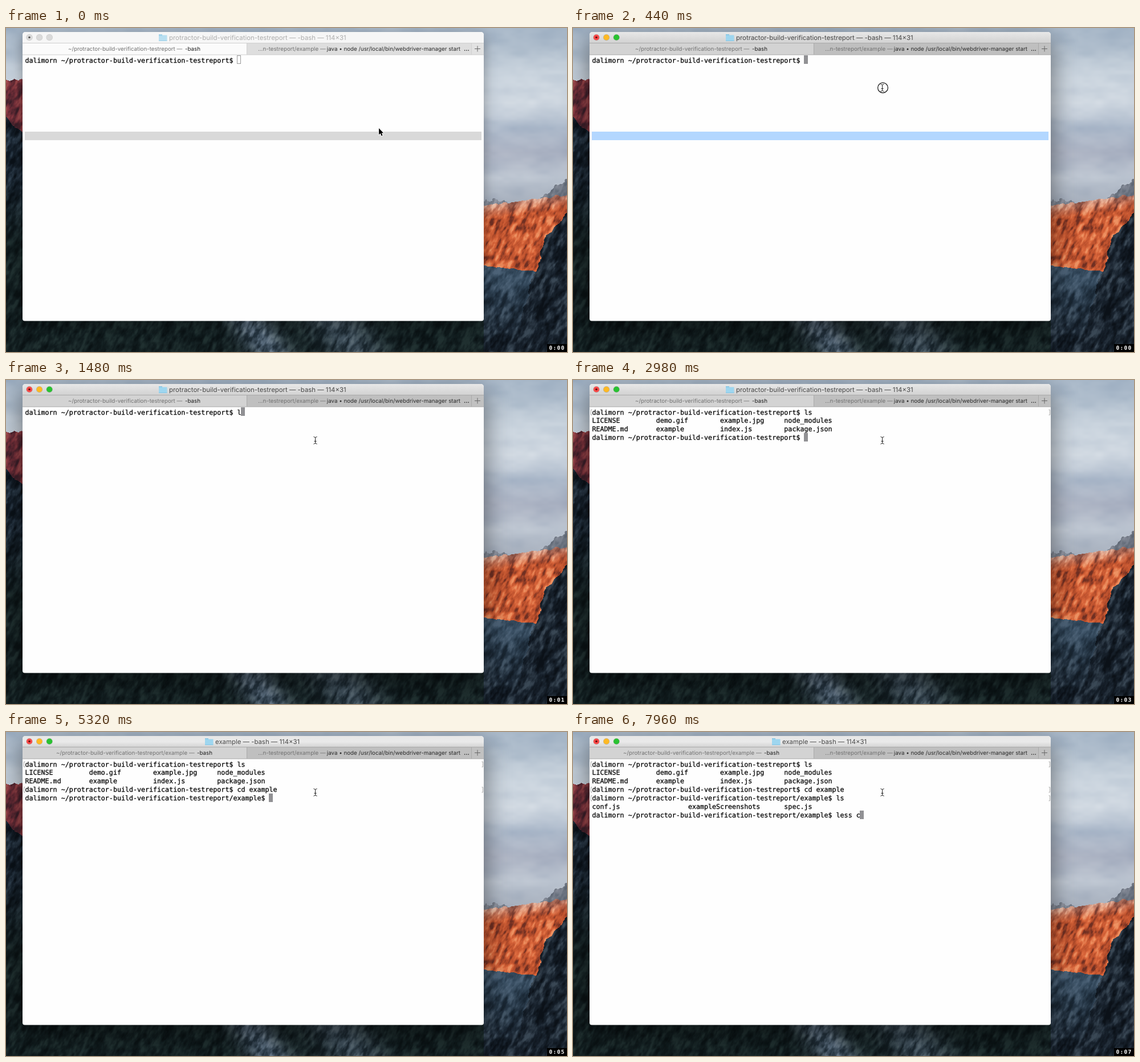
Recreate the animation shown at these times as an HTML page with a canvas. Size 984 by 569 pixels, loop 8000 ms.

```html
<!DOCTYPE html>
<html lang="en">
<head>
<meta charset="utf-8">
<title>Terminal session</title>
<style>
  html, body { margin: 0; width: 100%; height: 100%; overflow: hidden; background: #10181f; }
  canvas { display: block; }
</style>
</head>
<body>
<canvas id="stage" width="984" height="569"></canvas>
<script>
const W = 984, H = 569, LOOP = 8000;
const ctx = document.getElementById('stage').getContext('2d');
const MONO = '11.667px "DejaVu Sans Mono", monospace';
const CELL = 7.024, ROW = 14.88, LEFT = 33.5, TOP = 48.3;
const TITLE = '11.4px Inter, sans-serif';
const TAB = '9.75px Inter, sans-serif';
const WIN = { x: 29, y: 7, w: 809, h: 507.5, bar: 20 };
const RIGHT = WIN.x + WIN.w;

// ---- timing ----
const STEP = 150, MOVE = 140, CLICK = 440, RELEASE = 580;
const REPO = 'protractor-build-verification-testreport';
const EXAMPLE = REPO + '/example';
const prompt = dir => `dalimorn ~/${dir}$ `;

// A burst is a start time and its strokes, one per step.
const session = [
  { dir: REPO, bursts: [[1480, ...'ls']], enter: 1780, out: [
    'LICENSE         demo.gif        example.jpg     node_modules',
    'README.md       example         index.js        package.json'] },
  { dir: REPO, bursts: [[3730, ...'cd '], [4430, 'e'], [4730, 'xa', 'mp', 'le']], enter: 5320, out: [] },
  { dir: EXAMPLE, bursts: [[5470, ...'ls']], enter: 5760, out: [
    'conf.js                 exampleScreenshots      spec.js'] },
  { dir: EXAMPLE, bursts: [[6510, ...'le'], [6960, ...'ss '], [7960, 'c']], enter: Infinity, out: [] }
];
const ENTERED = session[1].enter;

function typedAt(t, bursts) {
  return bursts.map(([start, ...strokes]) =>
    strokes.filter((_, i) => t >= start + i * STEP).join('')).join('');
}
const secondsAt = t => Math.max(0, Math.floor((t - 880) / 1036) + 1);

// ---- helpers ----
const clamp = v => Math.min(1, Math.max(0, v));
const lerp = (a, b, u) => a + (b - a) * u;

function rect(color, x, y, w, h) {
  ctx.fillStyle = color;
  ctx.fillRect(x, y, w, h);
}
function line(color, width, ...points) {
  ctx.strokeStyle = color;
  ctx.lineWidth = width;
  ctx.beginPath();
  points.forEach(p => ctx.lineTo(...p));
  ctx.stroke();
}
function disc(color, x, y, r) {
  ctx.fillStyle = color;
  ctx.beginPath();
  ctx.arc(x, y, r, 0, 7);
  ctx.fill();
}
function shade(y0, y1, ...colors) {
  const fill = ctx.createLinearGradient(0, y0, 0, y1);
  colors.forEach((c, i) => fill.addColorStop(i / (colors.length - 1), c));
  return fill;
}
function label(str, x, y, font, color, align = 'left') {
  ctx.font = font;
  ctx.fillStyle = color;
  ctx.textAlign = align;
  ctx.fillText(str, x, y);
}

// ---- wallpaper ----
function hash(x, y) {
  const s = Math.sin(x * 127.1 + y * 311.7) * 43758.5453;
  return s - Math.floor(s);
}
function noise(x, y) {
  const ix = Math.floor(x), iy = Math.floor(y);
  const ease = v => v * v * (3 - 2 * v);
  const u = ease(x - ix), v = ease(y - iy);
  return lerp(lerp(hash(ix, iy), hash(ix + 1, iy), u),
    lerp(hash(ix, iy + 1), hash(ix + 1, iy + 1), u), v);
}
function fractal(x, y) {
  let sum = 0;
  for (let o = 1; o <= 4; o *= 2) sum += noise(x * o, y * o) / o;
  return sum / 1.75;
}
function ramp(...hexes) {
  const colors = hexes.map(h => [1, 3, 5].map(i => parseInt(h.slice(i, i + 2), 16)));
  return v => {
    const at = clamp(v) * (colors.length - 1), i = Math.min(Math.floor(at), colors.length - 2);
    return colors[i].map((c, k) => lerp(c, colors[i + 1][k], at - i));
  };
}
const blend = (a, b, u) => a.map((c, i) => lerp(c, b[i], clamp(u)));

const sky = ramp('#9caec1', '#adbccb', '#d3dce4', '#d9e0e7', '#a9b6c8', '#a2a8ba', '#b9c1cd', '#9da5b3');
const cloud = ramp('#8d9fb6', '#e6ebef');
const cliff = ramp('#6f2f22', '#b64d2b', '#d9653a', '#ee9262');
const snow = ramp('#8e5a4e', '#ecd6cc');
const ridge = ramp('#5d6673', '#9196a2');
const valley = ramp('#1f2f3e', '#33485b', '#4d6378');
const rock = ramp('#0b1118', '#18222d', '#3a4855');
const redRock = ramp('#3c1f29', '#77303a', '#a24b4d');
const slope = ramp('#0a1118', '#16212c', '#30404f');
const forest = ramp('#0a1214', '#121e20', '#203030');
const granite = ramp('#24333f', '#566879', '#8494a3');

function wallpaperColor(x, y) {
  const soft = fractal(x / 45, y / 22);
  const grit = clamp((fractal((x + y * 0.4) / 7, y / 13) - 0.5) * 1.8 + 0.5);
  const jag = (fractal(x / 9, y / 14) - 0.5) * 18;
  if (x > WIN.x + 12 && y > 500 && x < RIGHT) {
    const patch = (center, width) => Math.exp(-(((x - center - (y - 515) * 0.7) / width) ** 2));
    return blend(forest(grit), granite(grit - 0.05), patch(425, 36) + patch(575, 52) * 0.65);
  }
  if (x < RIGHT - 5 && y > 90 + jag) {
    if (y < 160 + x + jag) return redRock(grit);
    return blend(slope(grit), forest(grit), (y - 260) / 120);
  }
  const across = x - RIGHT;
  const rockEdge = 945 + (372 - y) * (y < 372 ? 0.75 : 0.3);
  if (y > 318 && x > rockEdge + jag * 0.6) return rock(grit);
  if (y > 417 + across * 0.11 + jag * 0.3) return blend(valley(grit), rock(grit), (y - 440) / 110);
  const cliffTop = 311 - across * 0.13 + jag * 0.5;
  if (y > cliffTop) return blend(cliff(grit), snow(grit), 0.75 - (y - cliffTop) / 32);
  if (y > 304 - Math.max(0, across - 85) * 0.6 + jag) return ridge(grit);
  return blend(sky(y / 305), cloud(soft), 0.3);
}
function paintWallpaper() {
  const canvas = document.createElement('canvas');
  canvas.width = W;
  canvas.height = H;
  const g = canvas.getContext('2d'), image = g.createImageData(W, H);
  for (let y = 0; y < H; y++) {
    for (let x = 0; x < W; x++) {
      const hidden = x > 40 && x < 830 && y > 15 && y < 505;
      if (!hidden) image.data.set([...wallpaperColor(x, y), 255], (y * W + x) * 4);
    }
  }
  g.putImageData(image, 0, 0);
  return canvas;
}
const wallpaper = paintWallpaper();

// ---- window ----
function drawFrame(active, inExample) {
  const { x, y, w, h, bar } = WIN, split = 422, plus = 817, tabs = y + bar;
  ctx.save();
  ctx.beginPath();
  ctx.roundRect(x, y, w, h, [5, 5, 4, 4]);
  ctx.save();
  ctx.shadowColor = active ? 'rgba(0,0,0,.5)' : 'rgba(0,0,0,.35)';
  ctx.shadowBlur = active ? 44 : 22;
  ctx.shadowOffsetY = active ? 15 : 7;
  ctx.fillStyle = '#fefefe';
  ctx.fill();
  ctx.restore();
  ctx.clip();

  const [top, middle, bottom] = !active ? ['#f6f6f6', '#f6f6f6', '#f6f6f6']
    : inExample ? ['#e6e6e6', '#eaeaea', '#d2d2d2'] : ['#e8e8e8', '#dcdcdc', '#d1d1d1'];
  rect(shade(y, tabs, top, middle, bottom), x, y, w, bar);
  rect(active ? '#d3d3d3' : '#fbfbfb', x, tabs, split - x, bar);
  rect(active ? '#bfbfbf' : '#dedede', split, tabs, plus - split, bar);
  rect(active ? '#c1c1c1' : '#e2e2e2', plus, tabs, RIGHT - plus, bar);
  const edge = active ? '#aaaaaa' : '#d0d0d0';
  for (const rowY of [tabs - 1, tabs + bar - 0.5]) rect(edge, x, rowY, w, 1);
  for (const colX of [split, plus - 1]) rect(edge, colX, tabs, 1, bar);
  line('#666', 1, [plus + 5, 36.5], [plus + 15, 36.5]);
  line('#666', 1, [plus + 10, 31.5], [plus + 10, 41.5]);
  ctx.restore();
}
function drawButtons(active) {
  ['#fb4948', '#fdb924', '#29c231'].forEach((color, i) => {
    const x = 41 + i * 17.6;
    disc(active ? 'rgba(0,0,0,.18)' : '#cbcbcb', x, 16.5, 5.7);
    disc(active ? color : '#dadada', x, 16.5, 5.1);
  });
  disc(active ? '#6b0d0b' : '#555', 41, 16.5, 1.8);
}
function drawLabels(active, inExample) {
  const iconX = inExample ? 349 : 268, baseline = 40.4;
  ctx.globalAlpha = active ? 1 : 0.7;
  rect('#86c5e4', iconX, 11, 6, 3);
  rect('#9ed6ef', iconX, 12.5, 14.5, 10);
  rect('#86c5e4', iconX, 22, 14.5, 1);
  ctx.globalAlpha = 1;

  const name = inExample ? 'example' : REPO;
  label(`${name} — -bash — 114×31`, iconX + 18, 20.7, TITLE, active ? '#474747' : '#adadad');
  label(`~/${inExample ? EXAMPLE : REPO} —`, inExample ? 88 : 109, baseline, TAB, '#707070');
  label('-bash', inExample ? 362 : 341, baseline, TAB, '#1c1c1c', 'right');
  label('...n-testreport/example —', 442, baseline, TAB, '#707070');
  label('java • node /usr/local/bin/webdriver-manager start', 797, baseline, TAB, '#292929', 'right');
  label('...', 803, baseline, 'bold ' + TAB, '#222');
}

// ---- terminal contents ----
function screenRows(t) {
  const rows = [];
  for (const { dir, bursts, enter, out } of session) {
    const done = t >= enter;
    rows.push({ text: prompt(dir) + typedAt(t, bursts), marked: done });
    if (!done) break;
    out.forEach(text => rows.push({ text }));
  }
  return rows;
}
function drawBracket(x, y, side) {
  line('#a6a6a6', 1, [x + 2 * side, y + 4], [x, y + 4], [x, y + 13], [x + 2 * side, y + 13]);
}
function drawRows(rows, active) {
  rows.forEach(({ text, marked }, i) => {
    const y = TOP + i * ROW;
    label(text, LEFT, y + 12.3, MONO, '#000');
    line('#000', 0.25);
    ctx.strokeText(text, LEFT, y + 12.3);
    if (!marked) return;
    drawBracket(WIN.x + 2.5, y, 1);
    drawBracket(RIGHT - 1.5, y, -1);
  });
  const last = rows.length - 1;
  const x = Math.floor(LEFT + rows[last].text.length * CELL - 0.3);
  const y = Math.round(TOP + last * ROW);
  if (active) return rect('#919194', x, y, 7, 15);
  ctx.strokeStyle = '#9a9a9a';
  ctx.lineWidth = 1;
  ctx.strokeRect(x + 0.5, y + 0.5, 6, 14);
}

// ---- pointer and timer ----
function drawArrow(x, y) {
  ctx.save();
  ctx.translate(x, y);
  ctx.lineJoin = 'round';
  ctx.beginPath();
  [[0, 0], [0, 11.5], [2.7, 9], [4.6, 13.4], [6.5, 12.6], [4.7, 8.4], [8.2, 8.4]]
    .forEach(p => ctx.lineTo(...p));
  ctx.closePath();
  ctx.strokeStyle = '#fff';
  ctx.lineWidth = 2;
  ctx.stroke();
  ctx.fillStyle = '#000';
  ctx.fill();
  ctx.restore();
}
function drawBeam(x, y) {
  line('#222', 1, [x, y - 5], [x, y + 5]);
  line('#222', 1, [x - 2, y + 1.5], [x + 2, y + 1.5]);
  for (const s of [-1, 1]) line('#222', 1, [x - 3, y + 6.5 * s], [x, y + 5 * s], [x + 3, y + 6.5 * s]);
}
function drawPointer(t) {
  if (t < CLICK) {
    const u = Math.max(0, Math.floor((t - MOVE) / STEP) + 1) / 2;
    return drawArrow(lerp(654, 543, u), lerp(176, 105, u));
  }
  const pressed = t < RELEASE;
  drawBeam(542.5, pressed ? 105 : 106);
  if (!pressed) return;
  ctx.strokeStyle = '#111';
  ctx.lineWidth = 1.2;
  ctx.beginPath();
  ctx.arc(543.5, 105, 8.9, 0, 7);
  ctx.stroke();
}
function drawTimer(t) {
  rect('#000', 949, 555, 35, 14);
  ctx.letterSpacing = '1.2px';
  label('0:0' + secondsAt(t), 952.5, 565, 'bold 9.6px "DejaVu Sans Mono", monospace', '#fff');
  ctx.letterSpacing = '0px';
}

function draw() {
  const t = performance.now() % LOOP;
  const active = t >= CLICK, inExample = t >= ENTERED;
  ctx.textRendering = 'geometricPrecision';
  ctx.drawImage(wallpaper, 0, 0);
  drawFrame(active, inExample);
  drawButtons(active);
  drawLabels(active, inExample);
  if (t < RELEASE) rect(active ? '#b3d7ff' : '#d9d9d9', 33, 182, 801, 15);
  drawRows(screenRows(t), active);
  drawPointer(t);
  drawTimer(t);
  requestAnimationFrame(draw);
}
draw();
</script>
</body>
</html>
```
